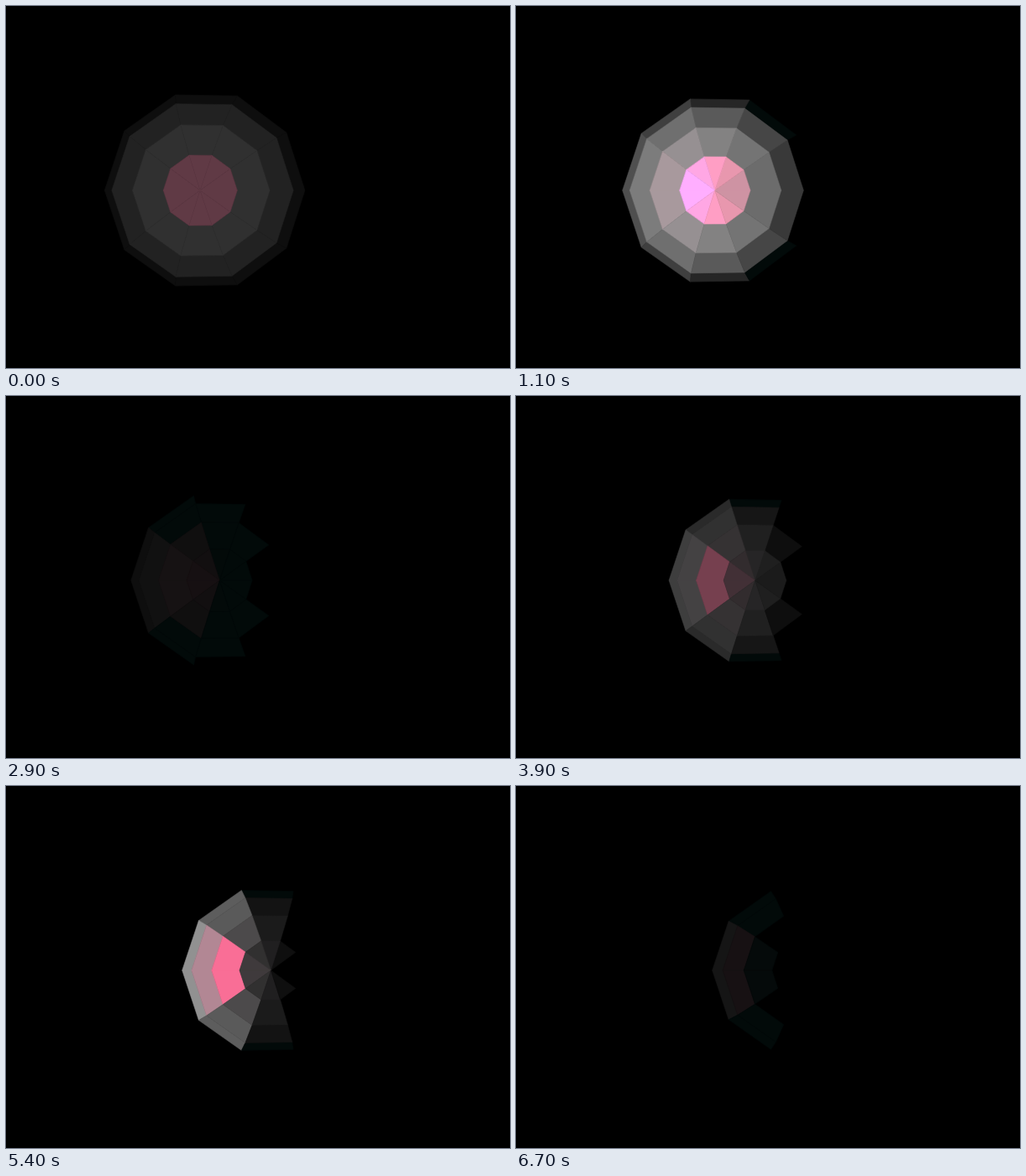
Animation, 600 px wide and 432 px high, one loop 6.8 s. Source, as an HTML page with a canvas:

```html
<!DOCTYPE html>
<html>
<head>
<meta charset="utf-8">
<title>Faceted sphere</title>
<style>
  html, body { margin: 0; width: 100%; height: 100%; overflow: hidden; background: #000; }
  canvas { display: block; }
</style>
</head>
<body>
<canvas id="stage" width="600" height="432"></canvas>
<script>
const ctx = document.getElementById('stage').getContext('2d');
const LOOP = 6800, STEP = 100, CUT = 3.15;   // CUT in seconds
const MID_Y = 220, SIDES = 10, RINGS = 4, SKEW = 0.018;
const BAND = 21.6 * Math.PI / 180;           // polar angle covered by one ring
const SECTOR = 2 * Math.PI / SIDES;
const SWING = 98 * Math.PI / 180;            // turn of the light over one loop
const SHINE = 1.9, GLOSS = 31;
const PINK = [1, 0.05, 0.32];

// Light strength at a few moments: [seconds, level]
const LIGHT = [[0, 57], [1.1, 160], [2, 105], [2.9, 18], [CUT, 0], [4.6, 132], [5.4, 152], [6.7, 24]];

// Smooth curve through [x, y] points
function spline(points, x) {
  const last = points.length - 1;
  const at = n => points[Math.max(0, Math.min(last, n))];
  let i = 0;
  while (i < last - 1 && x >= at(i + 1)[0]) i++;
  const slope = (a, b) => (b[1] - a[1]) / (b[0] - a[0]);
  const a = at(i), b = at(i + 1), span = b[0] - a[0];
  const u = (x - a[0]) / span, v = 1 - u;
  const m0 = slope(at(i - 1), b) * span, m1 = slope(a, at(i + 2)) * span;
  return a[1] * (1 + 2 * u) * v * v + m0 * u * v * v +
         b[1] * u * u * (3 - 2 * u) - m1 * u * u * v;
}

// Two camera moves: a slow speeding drift, then a steady one
function camera(s) {
  if (s < CUT) {
    return {
      pole: 231 + 3.4 * s + 1.6 * s * s,
      rim: 239.3 + 2.3 * s + 1.25 * s * s,
      radius: 119.5 - 4.7 * s
    };
  }
  const d = s - 4.6;
  return { pole: 299 + 20.5 * d, rim: 297.3 + 17.3 * d, radius: 100.8 - 0.9 * d };
}

// Direction to a polar angle and an azimuth; z points at the viewer
const direction = (polar, azimuth) => [
  Math.sin(polar) * Math.cos(azimuth),
  Math.sin(polar) * Math.sin(azimuth),
  Math.cos(polar)
];
const dot = (a, b) => a[0] * b[0] + a[1] * b[1] + a[2] * b[2];

// Matte grey plus a pink highlight; very dim greys fall to a faint teal
function shade(normal, angle, level) {
  const lit = level * dot(normal, direction(angle, Math.PI));
  if (lit < 7.5) return null;
  const facing = Math.max(0, dot(normal, direction(angle / 2, Math.PI)));
  const glow = SHINE * level * Math.sqrt(level / 140) * facing ** GLOSS;
  const base = lit < 13.6 ? [2, 10, 9] : [lit, lit, lit];
  const rgb = base.map((v, c) => Math.min(255, Math.round(v + glow * PINK[c])));
  return `rgb(${rgb})`;
}

function draw(ms) {
  const s = ms / 1000;
  const { pole, rim, radius } = camera(s);
  const level = Math.max(0, spline(LIGHT, s));
  const angle = SWING * ms / LOOP;

  function corner(ring, n) {
    const a = n * SECTOR, size = Math.sin(ring * BAND);
    const r = radius * size * (1 - SKEW * size * Math.cos(a));
    const x = pole + (rim - pole) * (1 - Math.cos(ring * BAND));
    return [x + r * Math.cos(a), MID_Y - r * Math.sin(a)];
  }

  ctx.fillStyle = '#000';
  ctx.fillRect(0, 0, 600, 432);
  ctx.lineWidth = 0.6;
  ctx.lineJoin = 'round';

  for (let ring = RINGS - 1; ring >= 0; ring--) {
    for (let n = 0; n < SIDES; n++) {
      const normal = direction((ring + 0.5) * BAND, (n + 0.5) * SECTOR);
      const color = shade(normal, angle, level);
      if (!color) continue;
      ctx.beginPath();
      ctx.moveTo(...corner(ring, n));
      ctx.lineTo(...corner(ring + 1, n));
      ctx.lineTo(...corner(ring + 1, n + 1));
      ctx.lineTo(...corner(ring, n + 1));
      ctx.closePath();
      ctx.fillStyle = ctx.strokeStyle = color;
      ctx.fill();
      ctx.stroke();
    }
  }
}

const start = performance.now();
function tick() {
  const t = (performance.now() - start) % LOOP;
  draw(Math.floor(t / STEP) * STEP);
  requestAnimationFrame(tick);
}
tick();
</script>
</body>
</html>
```
